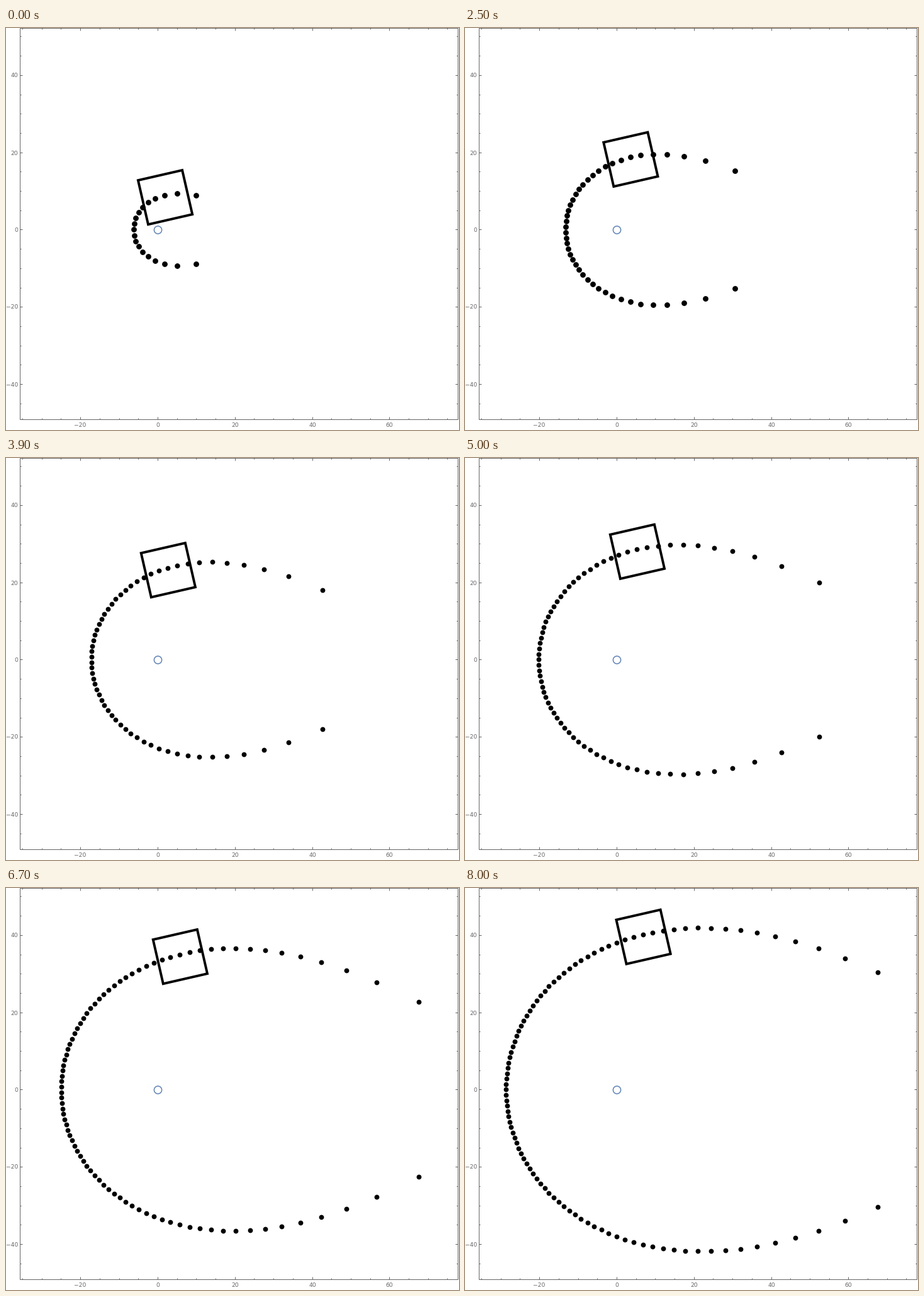
Recreate the animation shown at these times as a matplotlib script. Size 720 by 639 pixels, loop 8.1 s.

```python
"""Zeros of the truncated exponential series 1 + z + ... + z^n/n!, n = 19..99."""
import math

import numpy as np
import matplotlib.pyplot as plt
from matplotlib.animation import FuncAnimation
from matplotlib.patches import Circle, PathPatch, Polygon, Rectangle
from matplotlib.path import Path

WIDTH, HEIGHT, DPI = 720, 639, 100
PT = 72 / DPI  # points per pixel
LEFT, RIGHT, TOP, BOTTOM = 22, 718, 0, 622  # pixel columns and rows of the frame
X0, Y0, SCALE = 241.4, 320.9, 6.14
FIRST_DEGREE, FRAMES, INTERVAL = 19, 81, 100
GRAY, BLUE = "#666666", "#5e81b5"
BOX_SIDE, BOX_TILT, BOX_SHIFT = 72, math.radians(12.9), (0.3, 3)


def to_px(x, y):
    return X0 + SCALE * x, Y0 - SCALE * y


def upper_zeros(n):
    """Zeros with Im >= 0, ordered from the right end of the curve.

    Solves e^z = z^(n+1)/(n+1)! * F(z) by fixed-point iteration on log z.
    """
    m = np.arange(1, (n + 1) // 2 + 1)
    phase = 2j * np.pi * m / (n + 1)
    z = 0.45 * n * np.exp(phase)
    for _ in range(60):
        term = np.ones_like(z)
        tail = term.copy()
        for k in range(2, 72):
            term = term * z / (n + k)
            tail += term
        z = np.exp((z + math.lgamma(n + 2) - np.log(tail)) / (n + 1) + phase)
    return z


def draw_axes():
    ax.add_patch(Rectangle((LEFT, TOP), RIGHT - LEFT, BOTTOM - TOP,
                           fill=False, ec=GRAY, lw=PT))

    def tick(xs, ys):
        ax.plot(xs, ys, color=GRAY, lw=PT, solid_capstyle="butt")

    def label(x, y, value, **align):
        ax.text(x, y, str(value).replace("-", "\u2212"), color=GRAY,
                family="DejaVu Sans", size=9.2 * PT, va="baseline", **align)

    for v in range(-45, 80, 5):
        x, y = (math.floor(p) for p in to_px(v, v))
        major = v % 20 == 0
        size = 4 if major else 2
        if LEFT < x < RIGHT:
            tick([x, x], [BOTTOM, BOTTOM - size])
            tick([x, x], [TOP, TOP + size])
            if major:
                label(x, 634.5, v, ha="center")
        if TOP < y < BOTTOM:
            tick([LEFT, LEFT + size], [y, y])
            tick([RIGHT, RIGHT - size], [y, y])
            if major:
                label(19, y + 3.5, v, ha="right")


fig = plt.figure(figsize=(WIDTH / DPI, HEIGHT / DPI), dpi=DPI, facecolor="white")
ax = fig.add_axes([0, 0, 1, 1])
ax.set_xlim(0, WIDTH)
ax.set_ylim(HEIGHT, 0)
ax.axis("off")
draw_axes()

ax.add_patch(Circle((241.5, 321), 6.1, fill=False, ec=BLUE, lw=1.5 * PT))
dots = ax.add_patch(PathPatch(Path.unit_circle(), fc="black", lw=0, zorder=3))
dots.set_clip_path(Rectangle((LEFT, TOP), RIGHT - LEFT + 1, BOTTOM - TOP + 1,
                             transform=ax.transData))
box = ax.add_patch(Polygon(np.zeros((4, 2)), fill=False, ec="black",
                           lw=3.9 * PT, joinstyle="miter", zorder=4))

corner_angles = np.pi / 4 + np.pi / 2 * np.arange(4) - BOX_TILT
corners = BOX_SHIFT + BOX_SIDE / math.sqrt(2) * np.column_stack(
    [np.cos(corner_angles), np.sin(corner_angles)])
zeros_by_frame = [upper_zeros(FIRST_DEGREE + i) for i in range(FRAMES)]


def update(i):
    n = FIRST_DEGREE + i
    z = zeros_by_frame[i]
    both = np.concatenate([z, z.conj()[:n // 2]])

    # Dots sit on pixel centres.
    centers = np.floor(np.column_stack(to_px(both.real, both.imag))) + 0.5
    radius = 4.4 if n < 50 else 3.9
    dots.set_path(Path.make_compound_path(
        *[Path.circle(c, radius) for c in centers]))

    marked = z[(n + 2) // 6 - 1]
    box.set_xy(corners + to_px(marked.real, marked.imag))
    return dots, box


anim = FuncAnimation(fig, update, frames=FRAMES, interval=INTERVAL,
                     repeat=True, repeat_delay=0)
plt.show()
```
